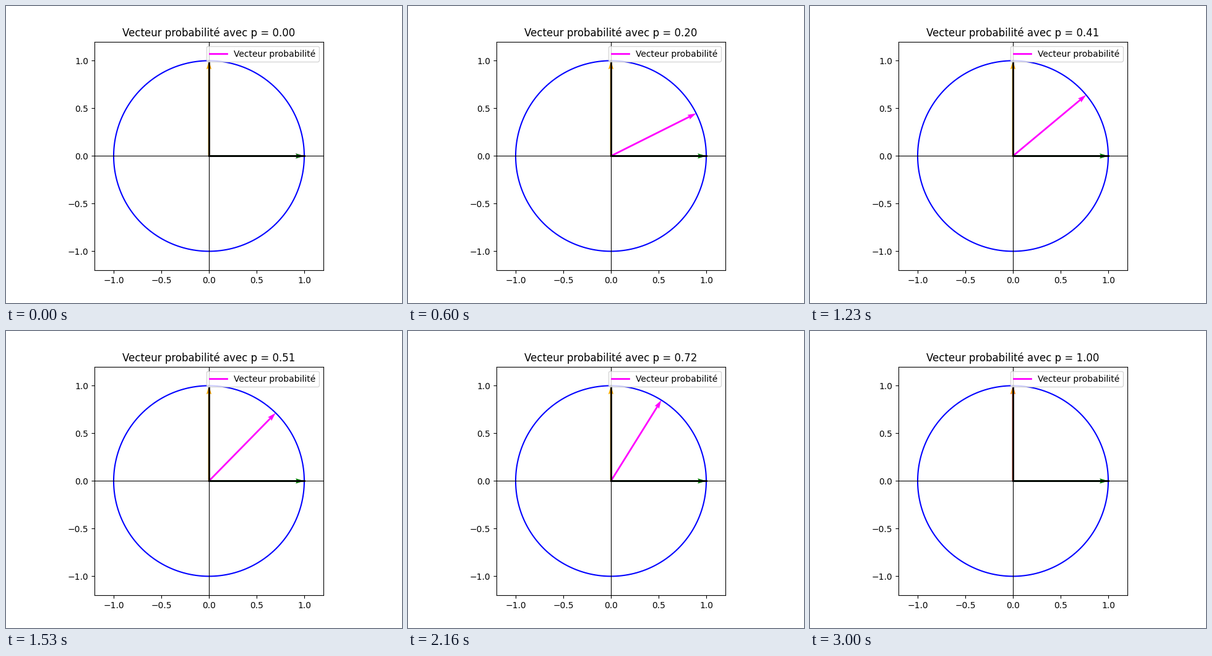
Write a matplotlib script that moves like this. It is 640 px wide and 480 px high and loops after 3.03 s.

```python
import numpy as np
import matplotlib.pyplot as plt
from matplotlib.animation import FuncAnimation

FRAMES = 101

fig, ax = plt.subplots(figsize=(6.4, 4.8), dpi=100)
ax.set_xlim(-1.2, 1.2)
ax.set_ylim(-1.2, 1.2)
ax.set_aspect("equal")


def arrow(x, y, color):
    return ax.quiver(0, 0, x, y, angles="xy", scale_units="xy", scale=1, color=color)


# Unit circle and axes
t = np.linspace(0, 2 * np.pi, 200)
ax.plot(np.cos(t), np.sin(t), color="blue")
ax.axhline(0, color="black", lw=0.8)
ax.axvline(0, color="black", lw=0.8)

# The moving vector lies under the two basis vectors
vector = arrow(1, 0, "magenta")
arrow(1, 0, "green")
arrow(0, 1, "orange")
ax.plot([0, 1], [0, 0], color="black", lw=2)
ax.plot([0, 0], [0, 1], color="black", lw=2)

ax.plot([], [], color="magenta", lw=2, label="Vecteur probabilité")
ax.legend(loc="upper right")
title = ax.set_title("")


def update(i):
    p = i / (FRAMES - 1)
    vector.set_UVC(np.sqrt(1 - p), np.sqrt(p))
    title.set_text(f"Vecteur probabilité avec p = {p:.2f}")
    return vector, title


anim = FuncAnimation(fig, update, frames=FRAMES, interval=30, repeat=True, repeat_delay=0)
plt.show()
```
